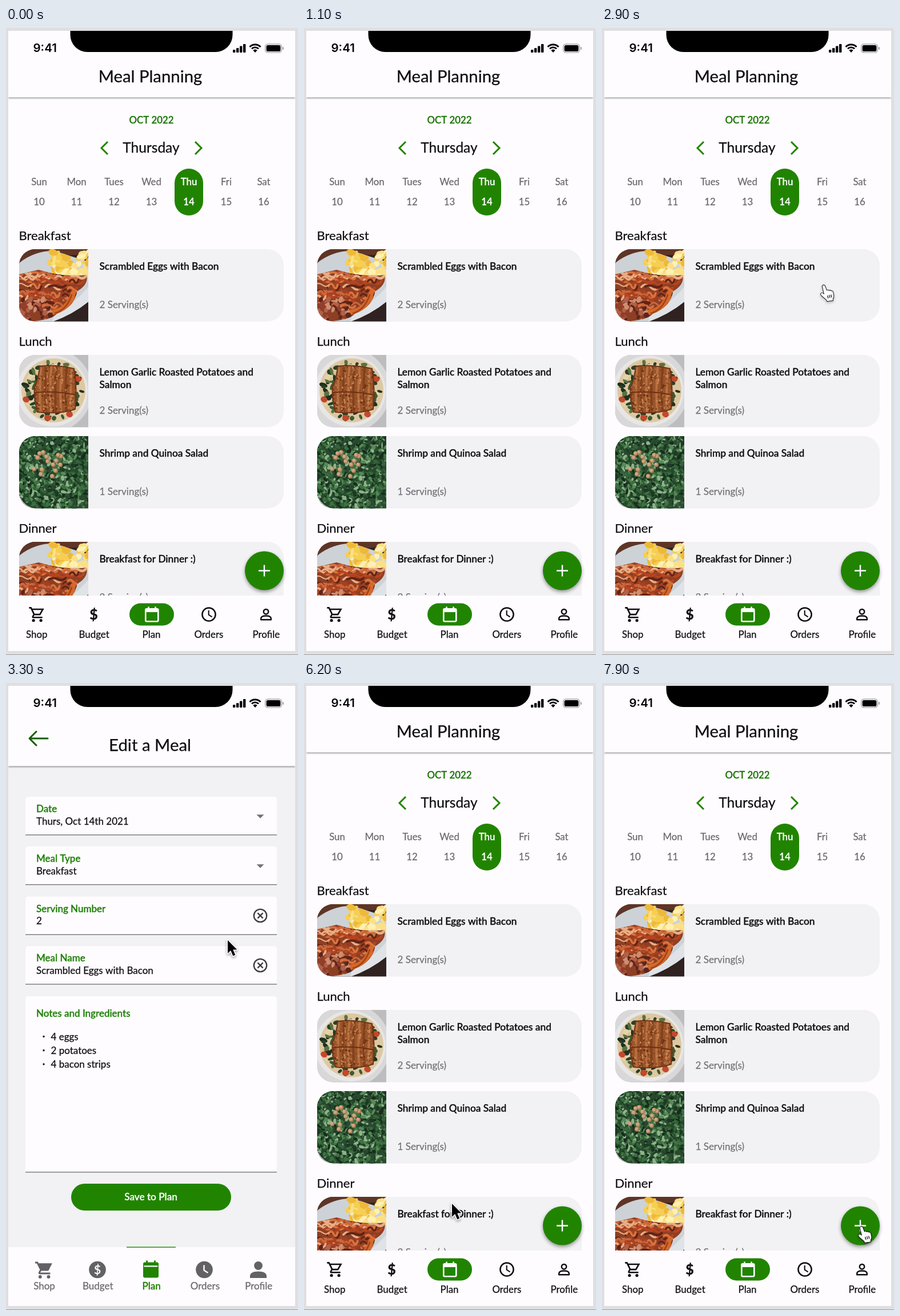
These frames come from a looping animation (511 px wide and 1097 px high, 8000 ms). An HTML page with a canvas:

```html
<!DOCTYPE html>
<html lang="en">
<head>
<meta charset="utf-8">
<title>Meal planner</title>
<style>
html, body { margin: 0; width: 100%; height: 100%; overflow: hidden; background: #dfdee1; }
canvas { display: block; width: 511px; height: 1097px; }
</style>
</head>
<body>
<canvas id="stage" width="511" height="1097"></canvas>
<script>
const W = 511, H = 1097, LOOP = 8000;
const OPEN_EDIT = 3000, CLOSE_EDIT = 5950;
const GREEN = '#218400', LABEL = '#1f8007', WHITE = '#fefcff', PANEL = '#f2f1f4';
const INK = '#0e0d10', GREY = '#69686d';
const stage = document.getElementById('stage').getContext('2d');
let g;

function seeded(seed) {
  return () => (seed = (seed * 16807) % 2147483647) / 2147483647;
}

// Drawing helpers
function rect(x, y, w, h, color, r = 0) {
  g.fillStyle = color;
  g.beginPath();
  g.roundRect(x, y, w, h, r);
  g.fill();
}
function ellipse(x, y, rx, ry, color, turn = 0) {
  g.fillStyle = color;
  g.beginPath();
  g.ellipse(x, y, rx, ry, turn, 0, Math.PI * 2);
  g.fill();
}
const disc = (x, y, r, color) => ellipse(x, y, r, r, color);
function ring(x, y, r, color, width) {
  g.strokeStyle = color;
  g.lineWidth = width;
  g.beginPath();
  g.arc(x, y, r, 0, Math.PI * 2);
  g.stroke();
}
function stroke(path, color, width) {
  g.strokeStyle = color;
  g.lineWidth = width;
  g.stroke(new Path2D(path));
}
function fill(path, color) {
  g.fillStyle = color;
  g.fill(new Path2D(path));
}
// A hairline outline gives Lato the heavier colour of a geometric face
function text(str, x, y, size, color = INK, weight = 400, align = 'left') {
  g.font = `${weight} ${size}px Lato, sans-serif`;
  g.textAlign = align;
  g.fillStyle = g.strokeStyle = color;
  g.lineWidth = weight > 400 ? 0.4 : 0.25;
  g.lineJoin = 'round';
  g.fillText(str, x, y);
  g.strokeText(str, x, y);
}
const centered = (str, x, y, size, color, weight) => text(str, x, y, size, color, weight, 'center');
function withShadow(blur, dy, alpha, draw) {
  g.save();
  g.shadowColor = `rgba(0,0,0,${alpha})`;
  g.shadowBlur = blur;
  g.shadowOffsetY = dy;
  draw();
  g.restore();
}
function at(x, y, scale, draw) {
  g.save();
  g.translate(x, y);
  g.scale(scale, scale);
  draw();
  g.restore();
}

// Shared phone frame
function phone(headerBottom, bodyColor) {
  rect(0, 0, W, H, '#dfdee1');
  rect(0, 1096, W, 1, '#9d9c9f');
  rect(4, 5, 502, 1085, bodyColor);
  g.save();
  g.beginPath();
  g.rect(4, 5, 502, 300);
  g.clip();
  withShadow(3, 1.5, 0.55, () => rect(4, 5, 502, headerBottom - 5, WHITE));
  g.restore();
  rect(112.5, 5, 284, 37, '#000', [0, 0, 30, 30]);
  g.font = '600 20.5px Inter, sans-serif';
  g.textAlign = 'left';
  g.fillStyle = '#050505';
  g.fillText('9:41', 47.5, 42);
  [5, 8, 11.5, 15].forEach((h, i) => rect(397 + i * 6, 43 - h, 4.4, h, '#000', 1.2));
  g.lineCap = 'butt';
  for (const r of [13, 8.2]) {
    g.strokeStyle = '#000';
    g.lineWidth = 2.8;
    g.beginPath();
    g.arc(436, 42, r, -Math.PI * 0.76, -Math.PI * 0.24);
    g.stroke();
  }
  fill('M436 43l-3.6-4q3.6-2.8 7.2 0z', '#000');
  g.beginPath();
  g.roundRect(453.7, 28.2, 28.6, 14.6, 4.5);
  g.strokeStyle = '#9a999c';
  g.lineWidth = 1.3;
  g.stroke();
  rect(455.6, 30, 24.8, 11, '#000', 2.8);
  rect(484, 33, 1.8, 5, '#9a999c', 1);
}

// Food pictures, reduced to simple shapes in a 121 x 127 box
function speckle(rnd, count, [x, y, w, h], size, colors) {
  for (let i = 0; i < count; i++) {
    ellipse(x + rnd() * w, y + rnd() * h, size * (0.5 + rnd()), size * (0.3 + rnd() * 0.6),
      colors[i % colors.length], rnd() * 3);
  }
}

function baconPhoto() {
  const rnd = seeded(41);
  rect(0, 0, 121, 127, '#2f2220');
  fill('M0 0H121V9L60 12L0 22z', '#5e3526');
  fill('M0 24Q28 2 62 3L121 22V92Q94 114 58 127H0z', '#cdd2d7');
  fill('M121 66Q100 92 62 112L58 127Q94 114 121 92z', '#dfe3e7');
  speckle(rnd, 60, [58, 4, 64, 42], 7, ['#f6cf52', '#fbe084', '#efb938', '#fff0b4']);
  const meat = new Path2D('M0 44L34 36Q78 50 118 45Q122 62 101 74Q98 100 66 113Q54 127 0 127z');
  g.save();
  g.clip(meat);
  rect(0, 0, 121, 127, '#8d3f24');
  g.lineCap = 'round';
  for (let i = 0; i < 75; i++) {
    const x = rnd() * 100 - 10, y = 38 + rnd() * 62, len = 12 + rnd() * 16;
    stroke(`M${x} ${y}q${len * 0.3} ${-9 + rnd() * 6} ${len * 0.6} 0t${len * 0.5} ${rnd() * 10 - 5}`,
      ['#b8441f', '#d9743f', '#5f2416', '#e9ad84', '#a9401f', '#c9663c'][i % 6], 2 + rnd() * 3);
  }
  stroke('M60 110Q86 106 95 76', '#d4692a', 9);
  stroke('M63 112Q83 106 92 80', '#a3421a', 2.5);
  speckle(rnd, 60, [0, 88, 56, 38], 5, ['#8f3f2b', '#cf8d70', '#5c251b', '#b0614a']);
  g.restore();
}

function salmonPhoto() {
  const rnd = seeded(77);
  rect(0, 0, 121, 127, '#bdbdbf');
  disc(54, 62, 74, '#d9d8d9');
  disc(58, 63, 62, '#e8e6e5');
  disc(60, 62, 56, '#dcc8a2');
  for (let i = 0; i < 110; i++) {
    const a = rnd() * Math.PI * 2, r = 34 + rnd() * 16;
    ellipse(60 + Math.cos(a) * r, 62 + Math.sin(a) * r, 2.5 + rnd() * 5, 2 + rnd() * 3,
      ['#28402a', '#3b5b33', '#1d3020', '#e6d2a7', '#5a713f', '#d9c197'][i % 6], rnd() * 3);
  }
  for (const [x, y] of [[12, 78], [50, 110], [88, 104], [103, 42]]) ellipse(x, y, 6, 5, '#c7472b', 0.4);
  const fillet = new Path2D('M36 20Q62 16 96 24Q102 60 98 95Q72 104 32 100Q25 72 27 56Q34 40 36 20z');
  g.save();
  g.clip(fillet);
  rect(0, 0, 121, 127, '#9a542a');
  for (let i = 0; i < 9; i++) {
    stroke(`M${30 + i * 9} 15q-5 45-1 90`, i % 2 ? '#b87040' : '#81401d', 4);
  }
  speckle(rnd, 220, [25, 16, 75, 84], 2, ['#6a3014', '#c98a58', '#8b421c', '#b06a3a']);
  stroke('M26 66Q62 62 100 70', '#6b2f12', 2);
  g.restore();
  g.strokeStyle = '#6e3417';
  g.lineWidth = 2;
  g.stroke(fillet);
}

function kalePhoto() {
  const rnd = seeded(123);
  rect(0, 0, 121, 127, '#2b4a30');
  speckle(rnd, 900, [0, 0, 121, 127], 3.8,
    ['#24482b', '#3d7040', '#568b56', '#162d1c', '#8fb48c', '#34633a', '#1d3a24']);
  for (let i = 0; i < 15; i++) {
    const x = 26 + rnd() * 48, y = 26 + rnd() * 48;
    disc(x, y, 4, '#a97c56');
    disc(x - 0.8, y - 0.8, 2.8, '#d0a680');
  }
  fill('M0 103Q6 119 24 127H0z', '#d5d6d6');
  stroke('M0 109Q8 121 20 127', '#777b79', 1.5);
}

function card(y, photo, lines, servings) {
  rect(23, y, 463, 126.5, PANEL, 28);
  g.save();
  g.beginPath();
  g.roundRect(23, y, 121, 126.5, [28, 0, 0, 28]);
  g.clip();
  g.translate(23, y);
  photo();
  g.restore();
  lines.forEach((line, i) => text(line, 163.5, y + 36 + i * 21.7, 17.3, INK, 500));
  text(`${servings} Serving(s)`, 163.5, y + 102.5, 17, '#737277');
}

// Icons on a 24-unit grid
function cart(color, filled) {
  g.lineJoin = 'miter';
  g.lineCap = 'butt';
  if (filled) fill('M5 4H21L17 12.5H8.5z', color);
  stroke('M1 3H3.6L8 12H15.6L19.6 5H5M7.6 12L6 15Q5.7 16 7 16H19', color, 2);
  disc(7, 20, 2, color);
  disc(17, 20, 2, color);
}

function planScreen() {
  phone(121.5, WHITE);
  centered('Meal Planning', 252.5, 95, 29.3);
  centered('OCT 2022', 254.5, 167, 16.8, '#1b7505', 500);
  g.lineCap = 'butt';
  g.lineJoin = 'miter';
  stroke('M178 199L167 210L178 221', GREEN, 3);
  stroke('M331 199L342 210L331 221', GREEN, 3);
  centered('Thursday', 254, 218, 24.5);
  rect(295, 246, 50, 82, GREEN, 25);
  ['Sun', 'Mon', 'Tues', 'Wed', 'Thu', 'Fri', 'Sat'].forEach((day, i) => {
    const x = 58 + i * 65.5, on = i === 4;
    centered(day, x, 275, 16.8, on ? '#fff' : GREY, on ? 500 : 400);
    centered(String(10 + i), x, 310, 16.8, on ? '#fff' : GREY, on ? 500 : 400);
  });
  text('Breakfast', 22.5, 371, 22);
  card(387, baconPhoto, ['Scrambled Eggs with Bacon'], 2);
  text('Lunch', 22.5, 556, 22);
  card(572, salmonPhoto, ['Lemon Garlic Roasted Potatoes and', 'Salmon'], 2);
  card(714, kalePhoto, ['Shrimp and Quinoa Salad'], 1);
  text('Dinner', 22.5, 883, 22);
  card(899, baconPhoto, ['Breakfast for Dinner :)'], 2);

  rect(4, 993, 502, 97, WHITE);
  withShadow(6, 3, 0.4, () => disc(452, 949.5, 34, GREEN));
  g.lineCap = 'butt';
  stroke('M442 949.5H462M452 939.5V959.5', '#fff', 2.4);

  rect(216, 1006.5, 78, 39, GREEN, 19.5);
  at(39, 1010.5, 1.3, () => cart(INK, false));
  centered('$', 153.5, 1034.5, 25, INK, 700);
  g.beginPath();
  g.roundRect(244.3, 1016.3, 22, 22, 2);
  g.strokeStyle = '#fff';
  g.lineWidth = 2.6;
  g.stroke();
  rect(244, 1016, 23, 6, '#fff');
  stroke('M249.5 1012.5V1018M261.5 1012.5V1018', '#fff', 2.6);
  ring(355, 1026, 11.6, INK, 2.5);
  stroke('M354.7 1019V1026.7L360.5 1030.3', INK, 2.1);
  ring(455, 1021.2, 4.2, INK, 2.5);
  stroke('M446.2 1035.3V1033Q446.5 1028.6 455 1028.6Q463.5 1028.6 463.8 1033V1035.3z', INK, 2.5);
  ['Shop', 'Budget', 'Plan', 'Orders', 'Profile'].forEach((name, i) =>
    centered(name, 53.7 + i * 100.4, 1067, 16.9));
}

function field(y, h, label, value) {
  rect(34, y, 440, h, WHITE, [5, 5, 0, 0]);
  rect(34, y + h - 1, 440, 1.5, '#807f83');
  if (!value) return;
  text(label, 53, y + 27, 17, LABEL, 500);
  text(value, 53, y + 48.7, 17, INK);
}

function clearButton(y) {
  ring(445, y, 11.2, '#3b3a3e', 2.3);
  stroke(`M440.4 ${y - 4.6}l9.2 9.2m0-9.2l-9.2 9.2`, '#3b3a3e', 2.3);
}

function editScreen() {
  phone(145.5, PANEL);
  g.lineCap = 'round';
  g.lineJoin = 'round';
  stroke('M73 97H41M53 85L41 97L53 109', '#145b00', 3);
  centered('Edit a Meal', 252, 119, 29.4);
  field(199, 67, 'Date', 'Thurs, Oct 14th 2021');
  field(286, 67, 'Meal Type', 'Breakfast');
  field(373.5, 67, 'Serving Number', '2');
  field(460.3, 67, 'Meal Name', 'Scrambled Eggs with Bacon');
  field(548, 308, '');
  for (const y of [230.3, 317.3]) fill(`M438.5 ${y}h13l-6.5 6.5z`, '#737277');
  g.lineCap = 'butt';
  clearButton(407);
  clearButton(494);
  text('Notes and Ingredients', 53, 584, 17, LABEL, 500);
  ['4 eggs', '2 potatoes', '4 bacon strips'].forEach((item, i) => {
    const y = 624.5 + i * 24.2;
    disc(66, y - 6, 1.7, INK);
    text(item, 78.5, y, 17);
  });
  rect(114, 876, 280, 47, GREEN, 23.5);
  centered('Save to Plan', 253.5, 905, 17.2, '#fff', 500);

  rect(4, 987, 502, 103, WHITE);
  rect(211, 986.2, 86, 1.8, '#43a02b');
  const icon = '#626166';
  at(49.5, 1009.5, 1.47, () => cart(icon, true));
  disc(160, 1026.5, 14.8, icon);
  centered('$', 160, 1034, 21, '#fff', 500);
  rect(240, 1013.5, 27, 27, GREEN, 3);
  rect(245, 1010.5, 3, 5, GREEN);
  rect(259, 1010.5, 3, 5, GREEN);
  rect(241.5, 1019.3, 24, 2.2, WHITE);
  disc(347, 1026.5, 14.8, icon);
  stroke('M346.5 1018.5V1027.5L353.5 1032', '#fff', 2.4);
  disc(441.5, 1019.5, 7.4, icon);
  fill('M427 1041V1037Q428 1029.5 441.5 1029.5Q455 1029.5 456 1037V1041z', icon);
  ['Shop', 'Budget', 'Plan', 'Orders', 'Profile'].forEach((name, i) =>
    centered(name, 67 + i * 93.8, 1061, 17, i === 2 ? GREEN : GREY, i === 2 ? 500 : 400));
}

function render(draw) {
  const layer = document.createElement('canvas');
  layer.width = W;
  layer.height = H;
  g = layer.getContext('2d');
  draw();
  return layer;
}

// Pointer: [time, x, y, easing into this stop]
const smooth = p => p * p * (3 - 2 * p), easeIn = p => p * p, easeOut = p => p * (2 - p);
const STOPS = [
  [1500, 515, 590], [1800, 477, 543, easeOut], [2250, 477, 543, smooth],
  [2750, 388, 450, smooth], [4200, 388, 450, smooth], [5000, 323, 589, easeIn],
  [5650, 259, 911, easeOut], [6300, 259, 911, smooth], [7300, 454, 951, smooth]
];

function pointerAt(t) {
  const next = STOPS.findIndex(s => s[0] > t);
  if (next < 0) return STOPS[STOPS.length - 1].slice(1, 3);
  const [t0, x0, y0] = STOPS[next - 1], [t1, x1, y1, ease] = STOPS[next];
  const p = ease((t - t0) / (t1 - t0));
  return [x0 + (x1 - x0) * p, y0 + (y1 - y0) * p];
}

function isLink(x, y, editing) {
  if (editing) return x > 114 && x < 394 && y > 876 && y < 923;
  return Math.hypot(x - 452, y - 949.5) < 34 || (y > 387 && y < 513);
}

const ARROW = new Path2D('M0 0V23L5.2 18L9.3 27.5L13.2 25.8L9.2 16.6H16.4z');
const HAND = new Path2D('M-2.4 1.6Q-.6-1.4 1.8 1L5.2 9.6Q7.5 7.4 9 10Q11.5 8 12.8 10.6Q15.6 9.4 16.2 12.4L17.4 18.5Q17.5 21.5 15.8 23.6L16 26.5L6 28L5 25.6L-3.6 18.2Q-6.6 14.6-3.6 13.8Q-1.6 13.8 1 16.2z');

function drawPointer(x, y, hand) {
  g = stage;
  g.save();
  g.translate(x, y);
  g.lineJoin = 'round';
  const shape = hand ? HAND : ARROW;
  withShadow(4, 2, 0.4, () => {
    g.strokeStyle = hand ? '#000' : '#fff';
    g.lineWidth = hand ? 1.8 : 3.2;
    g.stroke(shape);
  });
  g.fillStyle = hand ? '#fff' : '#000';
  g.fill(shape);
  if (hand) stroke('M6.6 18L8 23M9.6 17.2L11 22.2M12.6 16.4L13.8 21.4', '#000', 1.2);
  g.restore();
}

const plan = render(planScreen), edit = render(editScreen);
const start = performance.now();

function tick() {
  const t = (performance.now() - start) % LOOP;
  const editing = t >= OPEN_EDIT && t < CLOSE_EDIT;
  stage.drawImage(editing ? edit : plan, 0, 0);
  if (t >= STOPS[0][0]) {
    const [x, y] = pointerAt(t);
    drawPointer(x, y, isLink(x, y, editing));
  }
  requestAnimationFrame(tick);
}
tick();
</script>
</body>
</html>
```
